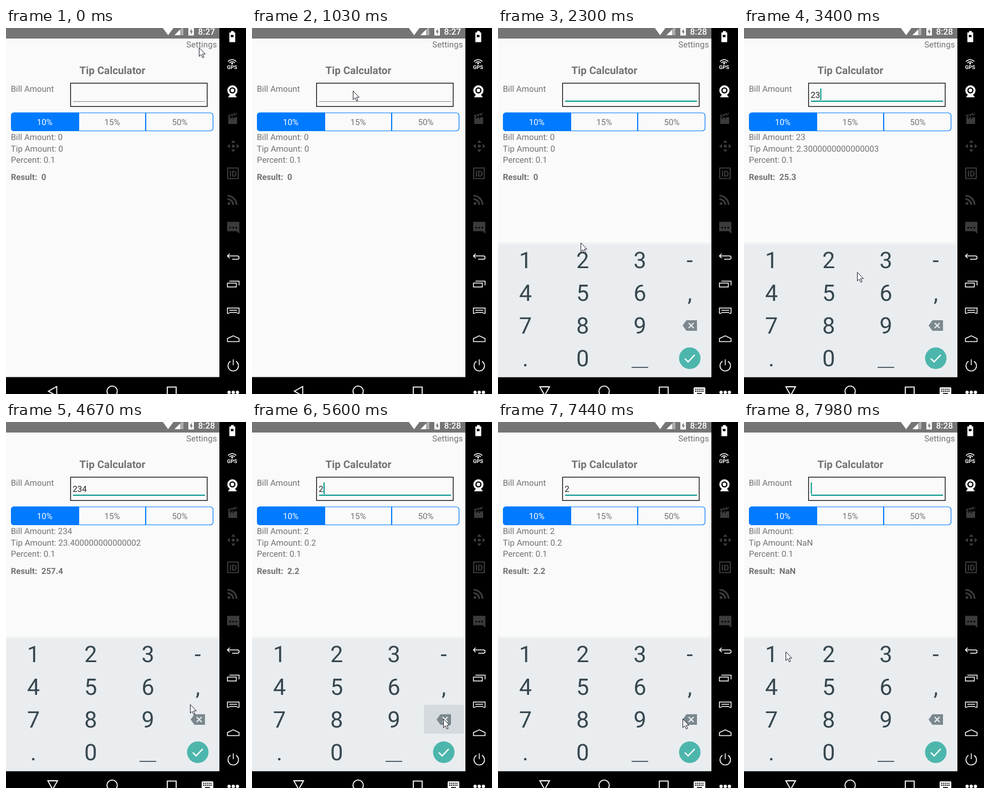
These frames come from a looping animation (433 by 660 pixels, 8 s). An HTML page:

```html
<!DOCTYPE html>
<html lang="en">
<head>
<meta charset="utf-8">
<title>Tip Calculator</title>
<style>
html, body { margin: 0; width: 100%; height: 100%; overflow: hidden; background: #000; }
svg { display: block; width: 433px; height: 660px; font-family: Roboto, sans-serif; }
text { white-space: pre; text-rendering: geometricPrecision; }
.body { font-size: 15.15px; fill: #737373; }
.title { font-size: 18.9px; }
.mid { text-anchor: middle; }
.bold { font-weight: 700; }
.keys { font-size: 41px; fill: #37474f; text-anchor: middle; }
.line { fill: none; stroke: #fff; stroke-width: 1.5; }
.dim { fill: #3b3b3b; }
.dimline { fill: none; stroke: #3b3b3b; }
</style>
</head>
<body>
<svg viewBox="0 0 433 660">
  <defs><clipPath id="screen"><rect width="385" height="629.5"/></clipPath></defs>
  <rect width="433" height="660" fill="#000"/>
  <rect width="385" height="629.5" fill="#fafafa"/>

  <rect width="385" height="19" fill="#757575"/>
  <g fill="#fff">
    <path d="M283 0H302L292.500 13Z"/>
    <path d="M304 13L320 -3V13Z" opacity=".4"/>
    <path d="M304 13L314 3V13Z"/>
    <path d="M329 0H339V13.500H329Z"/>
    <path d="M335 1L331.500 7.500H333.700V12L337 5.800H335Z" fill="#757575"/>
    <text id="clock" x="346.500" y="12" font-size="15.500" font-weight="500"></text>
  </g>

  <g class="body">
    <text x="325.200" y="35">Settings</text>
    <text class="mid bold title" x="192" y="83">Tip Calculator</text>
    <text x="8.700" y="115">Bill Amount</text>
    <text id="bill" x="8.700" y="202"></text>
    <text id="tip" x="8.700" y="222.500"></text>
    <text x="8.700" y="243">Percent: 0.1</text>
    <text id="total" class="bold" x="8.700" y="274"></text>
  </g>

  <rect x="116.500" y="99.500" width="246.500" height="42" fill="none" stroke="#000" stroke-width="1.300"/>
  <rect id="rule" x="121" width="238"/>
  <text id="entry" class="body" x="120.300" y="126" style="fill:#222"></text>
  <rect id="caret" y="109" width="2" height="21" fill="#009688"/>

  <rect x="9.500" y="153" width="364" height="32.500" rx="5" fill="#fafafa" stroke="#007aff" stroke-width="1.200"/>
  <path d="M131 152.500H14a5 5 0 0 0 -5 5V181a5 5 0 0 0 5 5H131Z" fill="#007aff"/>
  <path d="M131 153V185.500M252 153V185.500" stroke="#007aff" stroke-width="2"/>
  <g class="body mid">
    <text x="69.700" y="175" style="fill:#fff">10%</text>
    <text x="191.500" y="175">15%</text>
    <text x="313.500" y="175">50%</text>
  </g>

  <g clip-path="url(#screen)">
    <g id="board">
      <rect y="387" width="385" height="5" fill="#f0f2f3"/>
      <rect y="391" width="385" height="240" fill="#e9edf0"/>
      <rect id="press" height="52" rx="2" fill="#d5dade"/>
      <g id="keys" class="keys"></g>
      <rect x="241" y="611" width="30" height="2" fill="#546269"/>
      <path d="M333 536.500L340 527H359V546H340Z" fill="#7b888e"/>
      <path d="M344 532l9 9m0 -9l-9 9" stroke="#e9edf0" stroke-width="2.200"/>
      <circle cx="346" cy="595.500" r="19.400" fill="#4db6ac"/>
      <path d="M337 596l6 6l12 -12.500" fill="none" stroke="#fff" stroke-width="2.400"/>
    </g>
  </g>

  <g class="line" style="stroke-width:1.800">
    <path id="back"/>
    <circle cx="191.500" cy="655" r="9.300"/>
    <rect x="291" y="647.500" width="16" height="17"/>
  </g>
  <g id="imeIcon">
    <rect x="353" y="648" width="21" height="14" rx="1.500" fill="#fff"/>
    <path d="M355.500 651.500H372M355.500 655H372" stroke="#000" stroke-width="1.800" stroke-dasharray="2 1.300"/>
    <path d="M359 659H368" stroke="#000" stroke-width="1.600"/>
  </g>

  <g fill="#fff">
    <path d="M406 5.500h5v2.500h2.500V25.500H403V8h3Z"/>
    <path d="M405.500 12.500h5v4h-5Z" fill="#000"/>
    <path class="line" d="M400.500 60.500q7.500 -7 15 0M403 63q5 -4.500 10 0"/>
    <circle cx="408" cy="64" r="1.700"/>
    <text class="mid bold" x="408" y="73.500" font-size="9.500">GPS</text>
    <circle cx="408.500" cy="112.500" r="9.200"/>
    <circle cx="408.500" cy="112.500" r="5.500" fill="#000"/>
    <circle cx="408.500" cy="112.500" r="3.200"/>
    <path d="M404 120H413L416.500 125H400.500Z"/>
    <circle cx="402.500" cy="657" r="3"/><circle cx="410" cy="657" r="3"/><circle cx="417.500" cy="657" r="3"/>
  </g>

  <g class="dim">
    <path d="M401 161H417V173H401ZM400.500 157L416 152.500L417 156.500L401.500 160.500Z"/>
    <path d="M404 156l3 3.500m1.500 -5l3 3.500m1.500 -5l3 3.500M404 164l3 -3m2 3l3 -3" stroke="#000" stroke-width="1.300"/>
    <path d="M410 202l4 5h-8ZM410 224l4 -5h-8ZM399 213l5 -4v8ZM421 213l-5 -4v8Z"/>
    <circle cx="410" cy="213" r="2.700"/>
    <rect class="dimline" x="400" y="252.500" width="19" height="19" stroke-width="2"/>
    <text class="mid bold" x="409.700" y="267.500" font-size="15">ID</text>
    <circle cx="402.300" cy="316.500" r="2.500"/>
    <path class="dimline" d="M399.500 308.500a10.500 10.500 0 0 1 10.500 10.500M399.500 302.500a16.500 16.500 0 0 1 16.500 16.500" stroke-width="3.200"/>
    <path d="M399 349.500H421V371L416.500 366.500H399Z"/>
    <g fill="#000"><circle cx="404.500" cy="360" r="1.600"/><circle cx="410" cy="360" r="1.600"/><circle cx="415.500" cy="360" r="1.600"/></g>
  </g>

  <g class="line">
    <path d="M403.500 407L399.500 411L403.500 415M399.500 411H417.500a3 3 0 0 1 0 6H408"/>
    <path d="M399.500 460H415.500V467H399.500ZM403 456.500H420.500V464"/>
    <path d="M403 514.500H399.500V505H420.500V514.500H417M403 509H417M403 513H417"/>
    <path d="M399.500 560L410 555L420.500 560V565.500H399.500Z"/>
    <path d="M405 601a9.500 9.500 0 1 0 10 0M410 597.500V608"/>
  </g>

  <path id="cursor" d="M-.5 -.5V15.200L3 11.800L5.600 17.600L8 16.500L5.500 10.900H10.400Z" fill="#fff" stroke="#1c1c2c"/>
</svg>
<script>
const LOOP = 8000, FOCUS = 1400, FLASH = 110, BLINK = 500;
const $ = id => document.getElementById(id);

// Number pad: columns and rows are evenly spaced
const pad = ["123-", "456,", "789<", ".0"];
const colX = c => c < 3 ? 49.5 + 103.2 * c : 346;
const rowY = r => 418 + 59 * r;

function keyBox(key) {
  const r = pad.findIndex(row => row.includes(key));
  const c = pad[r].indexOf(key);
  return { x: colX(c), y: rowY(r), w: c < 3 ? 97 : 72 };
}

// The pointer rests at each stop from t until leave; a key is tapped on leaving
const rest = (t, leave, x, y) => ({ t, leave, x, y });
const tap = (t, leave, key) => ({ ...keyBox(key), t, leave, key });
const stops = [
  rest(0, 120, 349, 36), rest(600, 600, 88, 184), rest(1030, 1850, 183, 114),
  rest(2300, 2460, 150, 388), tap(2560, 2590, "2"), tap(2850, 3280, "3"),
  rest(3400, 3560, 205, 441), tap(3650, 3690, "4"), rest(3970, 4400, 292, 508),
  rest(4670, 4820, 333, 510), tap(4900, 5000, "<"), tap(5330, 5600, "<"),
  rest(6240, 6240, 64, 432), rest(6540, 6660, 118, 538), tap(7570, 7710, "<"),
  rest(7980, LOOP, 76, 415)
];
const taps = stops.filter(s => s.key);

$("keys").innerHTML = pad.map((row, r) => [...row].map((key, c) =>
  key === "<" ? "" : `<text x="${colX(c)}" y="${rowY(r) + 15}">${key}</text>`).join("")).join("");

const clamp = v => Math.min(1, Math.max(0, v));
const ease = v => v * v * (3 - 2 * v);

function pointer(t) {
  const i = stops.findLastIndex(s => s.t <= t);
  const a = stops[i], b = stops[i + 1] || a;
  const k = ease(clamp((t - a.leave) / (b.t - a.leave || 1)));
  return [a.x + (b.x - a.x) * k, a.y + (b.y - a.y) * k];
}

function show(id, on) { $(id).style.display = on ? "" : "none"; }
function set(id, attrs) {
  for (const name in attrs) $(id).setAttribute(name, attrs[name]);
}

function draw(t) {
  const done = taps.filter(s => s.leave <= t);
  const last = done[done.length - 1];
  const value = done.reduce((s, { key }) => key === "<" ? s.slice(0, -1) : s + key, "");
  const bill = last ? value : "0";
  const amount = parseFloat(bill);
  const tip = amount * 0.1;
  $("bill").textContent = "Bill Amount: " + bill;
  $("tip").textContent = "Tip Amount: " + tip;
  $("total").textContent = "Result:\u00a0 " + (amount + tip);
  $("entry").textContent = value;
  $("clock").textContent = t < 1700 ? "8:27" : "8:28";

  const focused = t >= FOCUS;
  set("rule", focused ? { y: 131, height: 2, fill: "#009688" } : { y: 132, height: 1, fill: "#848484" });
  set("caret", { x: 120.5 + value.length * 8.52 });
  show("caret", focused && (t - (last ? last.leave : FOCUS)) % (2 * BLINK) < BLINK);

  const rise = clamp((t - FOCUS) / 300);
  const open = rise > 0;
  show("board", open);
  show("imeIcon", open);
  set("board", { transform: `translate(0 ${242 * (1 - rise) ** 2})` });
  set("back", { d: open ? "M75.500 647H93L84.200 662.500Z" : "M91.500 646.500V663.500L76.500 655Z" });

  const pressed = last && t < last.leave + FLASH;
  show("press", pressed);
  if (pressed) set("press", { x: last.x - last.w / 2, y: last.y - 26, width: last.w });

  const [x, y] = pointer(t).map(Math.round);
  set("cursor", { transform: `translate(${x} ${y})` });
}

const start = performance.now();
function frame() {
  draw((performance.now() - start) % LOOP);
  requestAnimationFrame(frame);
}
frame();
</script>
</body>
</html>
```
